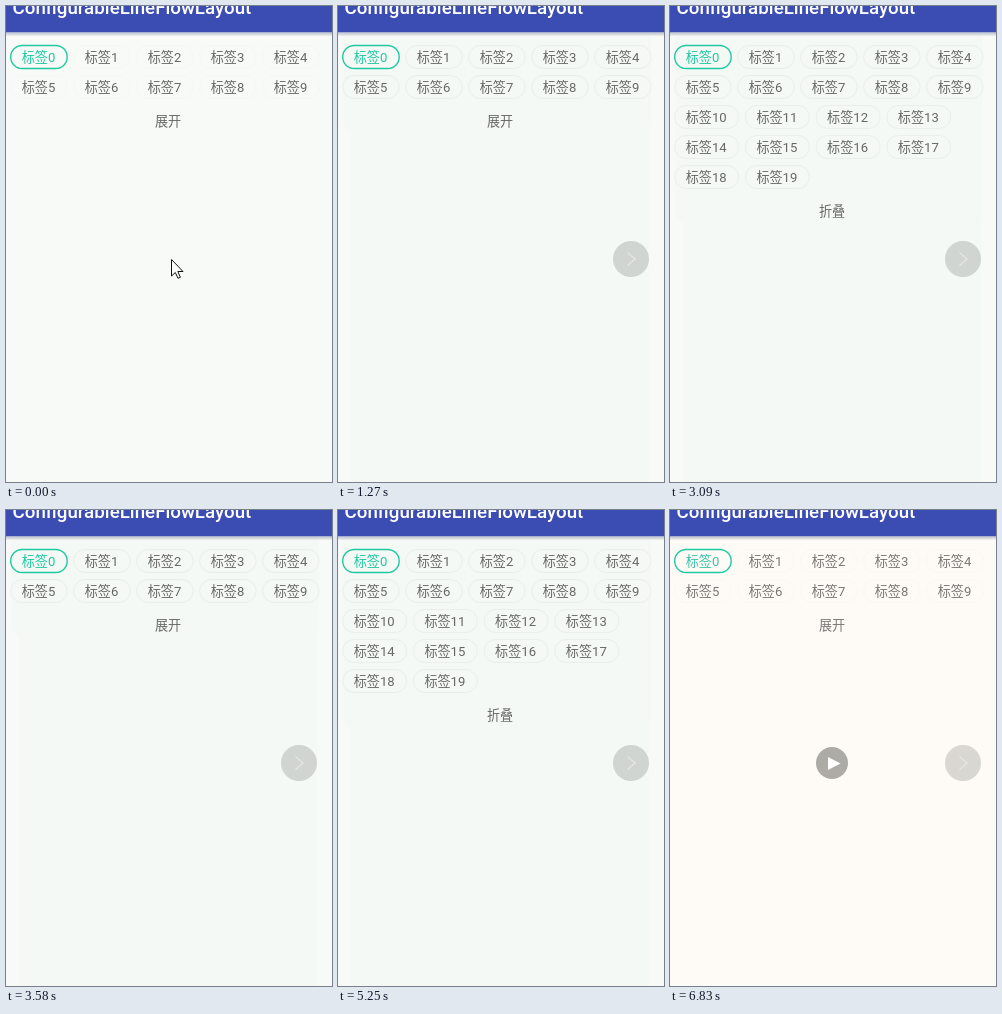
An HTML page that plays this animation: 326x476 px, repeating every 6930 ms.

```html
<!DOCTYPE html>
<html lang="zh">
<head>
<meta charset="utf-8">
<style>
  html, body { margin: 0; width: 100%; height: 100%; overflow: hidden; }
  svg { display: block; font: 13.125px Roboto, "Noto Sans CJK SC", "Noto Sans CJK", sans-serif; }
  .title { font-size: 18.75px; font-weight: 500; fill: #fff; }
  .tag rect { fill: none; stroke: #ebefeb; }
  .tag text, .toggle { fill: #666866; }
  .tag.on rect { stroke: #1ec8a0; stroke-width: 1.4; }
  .tag.on text { fill: #1ec8a0; }
  .dim .tag:not(.on) rect { opacity: .3; }
  .last .tag text, .last .toggle { fill: #787774; }
  .last .tag.on text { fill: #3cc3a6; }
</style>
</head>
<body>
<svg width="326" height="476" viewBox="0 0 326 476">
  <defs>
    <linearGradient id="shade" x2="0" y2="1">
      <stop stop-color="#b9bfc9"/>
      <stop offset="1" stop-color="#b9bfc9" stop-opacity="0"/>
    </linearGradient>
  </defs>
  <rect id="page" width="326" height="476"/>
  <g id="panel" fill="#f5f9f5">
    <rect id="panelTop" x="5" y="27" width="308" rx="8"/>
    <rect id="panelBody" x="13" y="27" width="298"/>
  </g>
  <rect width="326" height="26.5" fill="#3b4db3"/>
  <rect y="26.5" width="326" height="4" fill="url(#shade)"/>
  <text class="title" x="6.5" y="8">ConfigurableLineFlowLayout</text>
  <g id="firstRows"></g>
  <g id="moreRows"></g>
  <text id="toggle" class="toggle" x="162" text-anchor="middle"></text>
  <g id="next">
    <circle id="nextDisc" cx="293" cy="253" r="18"/>
    <path d="M289.5 246.5 297 253l-7.500 6.500" fill="none" stroke="#e3e6e2" stroke-width="1.4"/>
  </g>
  <g id="play">
    <circle cx="162" cy="253" r="16" fill="#acaba6"/>
    <path d="M158 247v13l12.500-6.500z" fill="#fff"/>
  </g>
  <path id="cursor" d="M.5.500V17L4.300 13.500 7 19.300 9.400 18.300 6.800 12.500H12Z" fill="#fff" stroke="#111"/>
</svg>
<script>
const LOOP = 6930;
const $ = id => document.getElementById(id);
const svg = document.querySelector('svg');
const show = (id, on) => $(id).setAttribute('visibility', on ? 'visible' : 'hidden');
const set = (id, name, value) => $(id).setAttribute(name, value);

function tag(i) {
  const short = i < 10;
  const perRow = short ? 5 : 4;
  const n = short ? i : i - 10;
  const row = Math.floor(n / perRow) + (short ? 0 : 2);
  const x = 4.7 + (n % perRow) * (short ? 63 : 70.7);
  const y = 39.5 + row * 30;
  return `<g class="tag${i ? '' : ' on'}">
    <rect x="${x}" y="${y}" width="${short ? 56.5 : 64}" height="23" rx="11.5"/>
    <text x="${x + 11}" y="${y + 16.5}">标签${i}</text></g>`;
}
const tags = Array.from({ length: 20 }, (_, i) => tag(i));
$('firstRows').innerHTML = tags.slice(0, 10).join('');
$('moreRows').innerHTML = tags.slice(10).join('');

// Pointer stops: [start time, x, y]
const stops = [[0, 165, 253], [570, 193, 294], [690, 229, 347], [840, 267, 410], [990, 302, 466]];

function draw(t) {
  const last = t >= 6830;
  const start = t < 570;
  const open = !last && t >= 1420 && !(t >= 3330 && t < 4120);

  svg.setAttribute('class', last ? 'last dim' : start ? 'dim' : '');
  set('page', 'fill', last ? '#fefbf6' : '#f8faf7');
  show('panel', !start && !last);
  set('panelTop', 'height', open ? 189 : 98);
  set('panelBody', 'height', t < 1120 ? 339 : 449);

  show('moreRows', open);
  $('toggle').textContent = open ? '折叠' : '展开';
  set('toggle', 'y', open ? 209.5 : 119.5);

  show('next', !start);
  set('nextDisc', 'fill', last ? '#d9d7d2' : '#d1d5d1');
  show('play', last);

  show('cursor', t < 1120);
  const [, x, y] = stops.filter(s => s[0] <= t).pop();
  set('cursor', 'transform', `translate(${x} ${y})`);
}

const begin = performance.now();
function tick() {
  draw((performance.now() - begin) % LOOP);
  requestAnimationFrame(tick);
}
tick();
</script>
</body>
</html>
```
